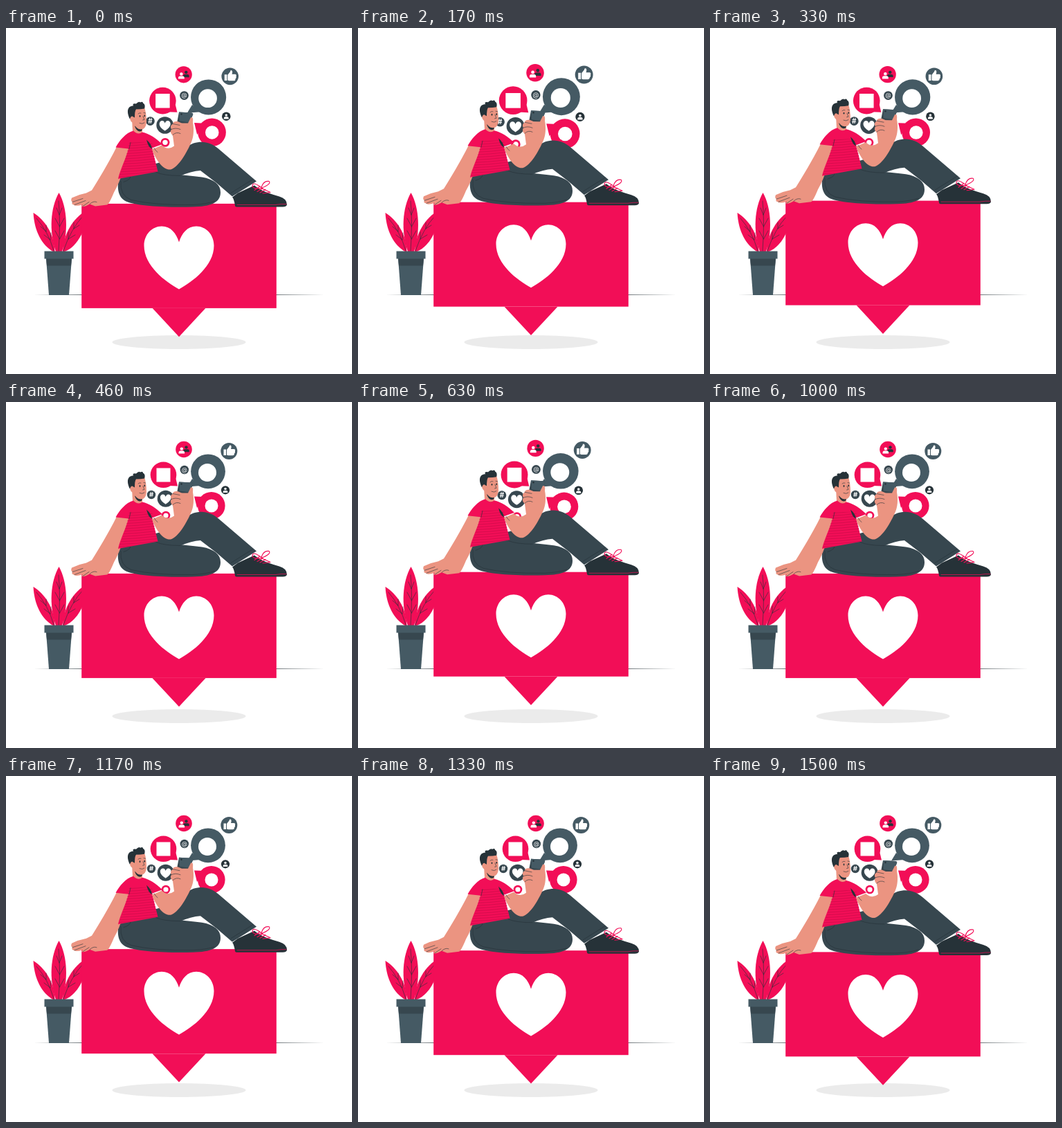
Animation, 500 px wide and 500 px high, one loop 1540 ms. Source, as an HTML page:

```html
<!DOCTYPE html>
<html lang="en">
<head>
<meta charset="utf-8">
<title>Social chat</title>
<style>
  html, body { margin: 0; width: 100%; height: 100%; overflow: hidden; background: #fff; }
  svg { display: block; width: 100vw; height: 100vh; }
  .pink { fill: #f20e57; }
  .slate { fill: #455a64; }
  .pants { fill: #37474f; }
  .ink { fill: #263238; }
  .skin { fill: #eb9481; }
  .white { fill: #fff; }
  .line { fill: none; stroke: #263238; stroke-width: .6; stroke-linecap: round; stroke-linejoin: round; }
  .lace { fill: none; stroke: #f20e57; stroke-width: 1.1; stroke-linecap: round; }
  .sole { stroke-width: .7; }
  text { font-family: Inter, Roboto, sans-serif; fill: #fff; text-anchor: middle; }
</style>
</head>
<body>
<svg viewBox="0 0 500 500">
  <defs>
    <path id="heart" d="M250 378C230 367 199.500 344 199.500 315C199.500 299 211 287 225 287C238 287 246 297 250 310C254 297 262 287 275 287C289 287 300.500 299 300.500 315C300.500 344 270 367 250 378Z"/>
    <g id="user">
      <circle r="2.300" cy="-2.300"/>
      <path d="M-4.500 5V3.500Q-4.500 .8-2 .8H2Q4.500 .8 4.500 3.500V5Z"/>
    </g>
    <clipPath id="torso"><path d="M178 165H211L219 208L162 218Q173 192 178 165Z"/></clipPath>
  </defs>

  <path class="ink" d="M40 385.500L145 385.050L250 385L355 385.050L460 385.500L355 385.950L250 386L145 385.950Z"/>
  <ellipse cx="250" cy="454" rx="96.500" ry="10" fill="#ebebeb"/>

  <g id="plant">
    <g class="pink">
      <path d="M68 323C52 314 41 294 39.500 267C56 277 70 298 70.500 323Z"/>
      <path d="M82 323C83 299 95 276 117 263C117 288 105 315 85 323Z"/>
      <path d="M72 323C62 294 64 260 76.500 238C89 260 90 296 81 323Z"/>
    </g>
    <path class="line" d="M69 322Q61 294 44 275M64 306L55 299M58 294L50 287M64 306L65 296M58 294L58 285M76 322Q79 280 76 250M77.500 305L71 293M77.500 305L84 293M77.500 287L71 275M77.500 287L84 275M77 270L73 260M77 270L81 260M83 322Q94 290 111 272M90 305L100 299M90 305L90 295M98 290L106 285M98 290L98 281"/>
    <path class="slate" d="M58 333H95L91 386H62Z"/>
    <path class="pants" d="M58 333H95L94 343.500H59Z"/>
    <rect class="slate" x="55.500" y="322.500" width="42" height="11"/>
  </g>

  <g id="bubbles">
    <g class="pink">
      <circle cx="257" cy="68.500" r="11.800"/>
      <path d="M235 121L248 121.500L245 109Z"/>
      <circle cx="227.500" cy="105.300" r="18.800"/>
      <path d="M276 153L272 136.500L287 137Z"/>
      <circle cx="296.800" cy="149.800" r="19.800"/>
      <circle cx="231" cy="164" r="6.300"/>
    </g>
    <g class="slate">
      <path d="M269 111L262 122.500L281 121Z"/>
      <circle cx="292" cy="100.300" r="24.900"/>
      <circle cx="322.300" cy="71" r="12"/>
    </g>
    <g class="pants">
      <circle cx="230.700" cy="139.800" r="12"/>
      <circle cx="257.800" cy="98" r="6.200"/>
      <circle cx="210" cy="134" r="6.200"/>
      <circle class="ink" cx="317" cy="127.300" r="6.100"/>
    </g>
    <use href="#user" class="ink" transform="translate(260.500 67.500) scale(.95)"/>
    <use href="#user" class="white" transform="translate(253.800 69.800) scale(.95)"/>
    <use href="#user" class="white" transform="translate(317 127.300) scale(.75)"/>
    <rect class="white" x="217.500" y="95.500" width="20" height="20"/>
    <circle class="white" cx="291" cy="102" r="13"/>
    <circle class="white" cx="297" cy="150" r="9.500"/>
    <circle class="white" cx="231" cy="164" r="3.600"/>
    <path class="white" d="M314.500 68.500H318V77H314.500ZM319 69L322.500 64.500Q322.800 62 324.500 62.500Q326.500 63.500 325 68H330Q332 69 331 71Q331.500 74 330 74.500Q330 77 328 77.300H321L319 76.500Z"/>
    <use href="#heart" class="white" transform="translate(230.700 140.500) scale(.155) translate(-250 -332)"/>
    <text x="257.800" y="100.800" font-size="8.500">@</text>
    <text x="210" y="137.400" font-size="9.500" font-weight="700">#</text>
  </g>

  <g id="floating">
    <rect class="pink" x="109.200" y="254.400" width="281.600" height="151"/>
    <path class="pink" d="M211.500 405.400H288.500L250 446.800Z"/>
    <use href="#heart" class="white"/>

    <g id="legs">
      <path class="pants" d="M212 197C236 195 256 172 271 167C285 163 296 166 307 175L362 222L327 244Q305 224 281 206.500Q268 207 250 215L216 210Z"/>
      <path class="line" d="M325 239L357 219"/>
      <path class="pants" d="M163 217L218 206C228 212 262 213 283 216C301 219 310 227 310 238C310 253 296 258.500 270 259C232 260 193 258 176 252C162 247 160 233 163 217Z"/>
      <path class="line" d="M217 209Q228 214 252 214M180 215Q180 220 170 223M166 222Q164 243 181 249Q215 257 270 256Q290 255 301 251"/>
      <path class="white" d="M327 244L360 224L362 227L331 247Z"/>
      <path class="ink" d="M331 257Q329 246 327 245L335 239L359 228C368 236 382 240 395 244Q406 247 406 256Q405 259 400 259H334Q331 259 331 257Z"/>
      <path class="lace sole" d="M334 256H390Q398 254.500 405 255"/>
      <path class="lace" d="M359 235L366 230M363 237L371 232M367 238.500L375 234M371 239.500L382 238M369 232Q356 234 356 228Q357 222 369 231Q372 221 380 222Q384 226 369 232L382 238"/>
    </g>

    <g id="rest-arm">
      <path class="skin" d="M160 172L178 173C174 194 166 221 156 238Q149 255 146 256L129 258L121 255Q112 260 109 258L111 255.500Q100 259 98 256Q94 255 96 252Q93 250 95 246Q105 241 116 239L124 235C135 217 147 198 160 172Z"/>
      <path class="line" d="M96 252L111 247M99 256L115 250M111 258L120 252M121 255Q126 250 131 252"/>
    </g>

    <g id="head">
      <path class="skin" d="M182 132H197L197 153Q190 157 183 150Z"/>
      <path class="ink" d="M186 142L197 146Q197 150 193 150Q188 149 186 142Z"/>
      <path class="skin" d="M184 119L200 115Q203 124 203 137Q202 147 195 147Q188 147 184.500 138Q179 136 179 130Q180 126 184 128Z"/>
      <path class="ink" d="M179 132C174 122 175 113 184 113Q182 109 188 110Q192 106 194 108Q198 106 198 109Q202 111 200 117Q195 118 188 118Q186 120 186 130L184 129Q181 126 179 132Z"/>
      <ellipse class="ink" cx="193.500" cy="128" rx=".9" ry="1.400"/>
      <ellipse class="ink" cx="200.300" cy="127.500" rx=".9" ry="1.400"/>
      <path class="line" d="M191 124.500Q193 122.500 195 123.500M199 123L201.500 123.500M198 128L200 133L197.500 133.500M193 138Q197 140 200 137.500"/>
    </g>

    <g id="shirt">
      <path class="pink" d="M184 149C173 152 164 163 158.500 173L177 175C173 190 165 205 162 218.500L219.500 208L211 174L226 168.500C217 160 207 153 197 151Q191 156 184 149Z"/>
      <g id="stripes" clip-path="url(#torso)" fill="none" stroke="#b90b42" stroke-width=".5"></g>
      <path class="line" d="M178 175L180 166"/>
      <path class="ink" d="M203 162Q210 168 211 175Q206 174 203 162Z"/>
    </g>

    <g id="phone-arm">
      <path class="pants" d="M250 122L268 123Q271 124 270 126L265 139L247 138Z"/>
      <path class="slate" d="M250 122L268 123Q271 124 270 126L265 137L251 135Z"/>
      <circle class="ink" cx="253.500" cy="125" r="1.200"/>
      <path class="skin" d="M211 176L225 170Q234 178 243 171L241 156Q236 151 239 147Q236 142 241 139Q241 135 248 135.500L254 138L263 138L267 130Q271 128 270 137C272 148 271 158 268 165C261 181 249 202 238 205C227 206 217 192 211 176Z"/>
      <path class="line" d="M241 139L251 141M239 147Q245 144 252 147M241 155Q246 150 252 153M214 174Q216 178 219 180"/>
    </g>
  </g>
</svg>
<script>
  const PERIOD = 1540, LEAD = 40;
  const BEAT = [[0, 1], [.1, 1.1], [.3, 1], [.4, 1], [.5, 1.1], [.6, 1], [1, 1]];
  const FLOAT = [[0, 0], [.5, -10], [1, 0]];
  const byId = id => document.getElementById(id);

  const stripes = byId('stripes');
  for (let y = 166; y < 222; y += 3.7) {
    const path = document.createElementNS(stripes.namespaceURI, 'path');
    path.setAttribute('d', `M158 ${y + 2}Q190 ${y + 1} 222 ${y - 3}`);
    stripes.append(path);
  }

  function sample(keys, phase) {
    const i = keys.findIndex(([at]) => at > phase);
    const [t0, v0] = keys[i - 1], [t1, v1] = keys[i];
    return v0 + (v1 - v0) * (phase - t0) / (t1 - t0);
  }

  function draw() {
    const phase = (performance.now() + LEAD) % PERIOD / PERIOD;
    byId('floating').setAttribute('transform', `translate(0 ${sample(FLOAT, phase)})`);
    byId('bubbles').setAttribute('transform',
      `translate(269 113.500) scale(${sample(BEAT, phase)}) translate(-269 -113.500)`);
    requestAnimationFrame(draw);
  }
  draw();
</script>
</body>
</html>
```
